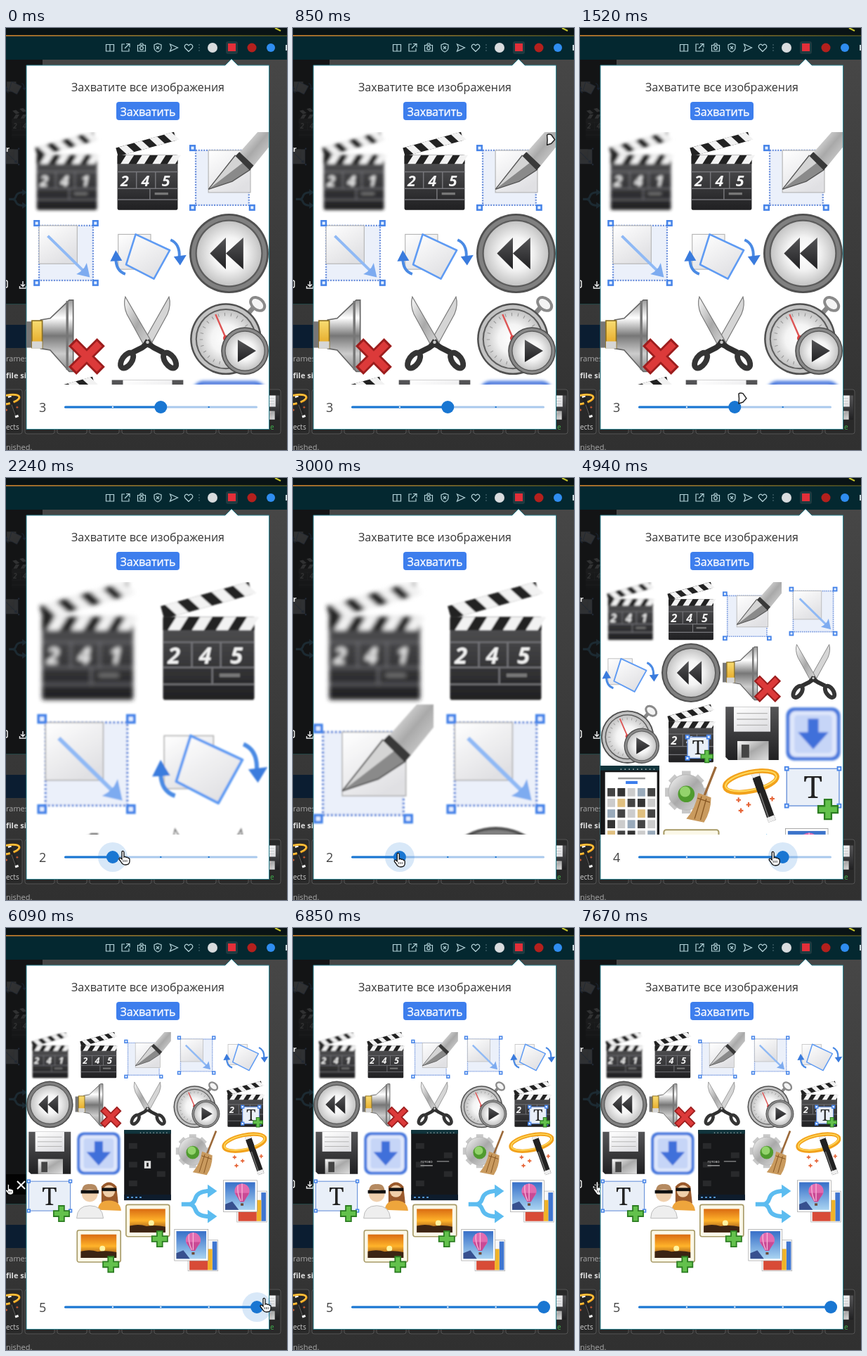
These frames come from a looping animation (400 by 600 pixels, 7700 ms). An HTML page:

```html
<!DOCTYPE html>
<html lang="ru">
<head>
<meta charset="utf-8">
<style>
html, body { margin: 0; width: 100%; height: 100%; overflow: hidden; background: #3a3a3a }
svg { display: block }
text { font-family: "Open Sans", "Noto Sans", sans-serif }
</style>
</head>
<body>
<svg id="stage" width="400" height="600" viewBox="0 0 400 600"></svg>
<script>
const LOOP = 7700, stage = document.getElementById('stage');
const R = (x, y, w, h, fill, more = '') => `<rect x="${x}" y="${y}" width="${w}" height="${h}" fill="${fill}" ${more}/>`;
const C = (x, y, r, fill, more = '') => `<circle cx="${x}" cy="${y}" r="${r}" fill="${fill}" ${more}/>`;
const P = (d, fill, more = '') => `<path d="${d}" fill="${fill}" ${more}/>`;
const L = (d, color, w, more = '') => P(d, 'none', `stroke="${color}" stroke-width="${w}" ${more}`);
const E = (x, y, rx, ry, turn, fill, color, w) =>
  `<ellipse rx="${rx}" ry="${ry}" fill="${fill}" stroke="${color}" stroke-width="${w}" transform="translate(${x} ${y}) rotate(${turn})"/>`;
const T = (x, y, size, fill, s, more = '') => `<text x="${x}" y="${y}" font-size="${size}" fill="${fill}" ${more}>${s}</text>`;
const G = (tf, s, more = '') => `<g transform="${tf}" ${more}>${s}</g>`;
const stops = colors => colors.map((c, i) => `<stop offset="${i / (colors.length - 1)}" stop-color="${c}"/>`).join('');
const grad = (id, colors, x2 = 0, y2 = 1) => `<linearGradient id="${id}" x1="0" y1="0" x2="${x2}" y2="${y2}">${stops(colors)}</linearGradient>`;
const blur = (id, d) => `<filter id="${id}"><feGaussianBlur stdDeviation="${d}"/></filter>`;

// Icon parts, drawn in a 100-unit cell
const bar = (tf, lean) => G(tf, R(0, 0, 76, 11, '#222') + [4, 24, 44, 63].map(x =>
  P(lean > 0 ? `M${x} 11l7-11h10l-7 11z` : `M${x} 0l7 11h10l-7-11z`, '#f2f2f2')).join(''));
const clap = digits => bar('translate(10 20) rotate(-15.5)', -1) + R(12, 29, 76, 69, 'url(#dark)', 'rx="2"') +
  bar('translate(12 29)', 1) + L('M12 50H88M12 71H88M36 50V71M60 50V71M53 71V85M12 85H88', '#77777b', 1.3) +
  [...digits].map((c, i) => T(16 + i * 26, 68, 19, '#f4f4f4', c, 'font-weight="700" font-style="italic"')).join('') +
  R(59, 76, 17, 3, '#777');
const handle = (x, y) => R(x - 4, y - 4, 8, 8, '#4583e8') + R(x - 1.8, y - 1.8, 3.6, 3.6, '#e4efff');
const frame = (x, y, w, h) => R(x, y, w, h, '#ebf0fa', 'stroke="#6c90dc" stroke-width="2" stroke-dasharray="1.8 1.5"');
const page = (x, y, w, h) => R(x, y, w, h, 'url(#paper)', 'stroke="#b4b4b4" stroke-width="1"');
const plus = (x, y, r) => [['#2c7d22', r * .8, r], ['#63c14c', r * .5, r * .85]].map(([c, w, q]) =>
  L(`M${x - q} ${y}h${2 * q}M${x} ${y - q}v${2 * q}`, c, w)).join('');
const textBox = (x, y, w, h, size) => R(x, y, w, h, '#e9eff8', 'stroke="#5b87d6" stroke-width="1.5"') +
  handle(x, y) + handle(x + w, y) + handle(x, y + h) + handle(x + w, y + h) +
  T(x + w / 2, y + h / 2 + size * .36, size, '#222', 'T', 'text-anchor="middle" style="font-family:\'Noto Serif\',serif"');
const disc = (x, y, r, ring) => C(x, y, r, '#505050') + C(x, y, r * .95, ring) + C(x, y, r * .85, '#5c5c5c') + C(x, y, r * .81, 'url(#dial)');
const photo = R(4, 5, 93, 68, '#fbf8e8', 'rx="4" stroke="#a89b68" stroke-width="2.5"') + R(12, 14, 76, 50, 'url(#sun)') +
  C(58, 44, 6, '#fff3a0') + P('M12 50q20-5 36 1 20-4 40 1v12H12z', '#3b2413') + plus(76, 78, 18);
const star = (x, y) => L(`M${x - 4} ${y}h8M${x} ${y - 4}v8`, '#e66436', 2.5);

const icons = [
  G('translate(1 0)', clap('241')),
  clap('245'),
  frame(8, 23, 67, 69) + page(24, 23, 53, 53) + handle(4, 20) + handle(4, 95) + handle(79, 95) +
    P('M24 72L58 29 68 38z', '#d4d4d4') + P('M24 72L68 38 77 47 54 62z', '#8a8a8a') + L('M24 72L58 29M24 72L54 62 77 47', '#555', 1.2) +
    P('M62 27L86 0H100V19L79 45z', 'url(#metal)') + P('M58 30L63 25 81 42 76 48z', '#393939'),
  frame(16, 15, 68, 69) + page(16, 15, 48, 48) + L('M27 28L76 76', '#8fb9f5', 3.5) + P('M80 80L63 76 68 73 73 68 76 62z', '#7dabf0') +
    handle(13, 12) + handle(87, 12) + handle(13, 87) + handle(87, 87),
  page(13, 26, 41, 44) + P('M35 26L78 46 58 82 23 64z', 'url(#paper)', 'stroke="#5f9bf3" stroke-width="2.3" stroke-linejoin="round"') +
    L('M22 76Q10 72 10 56M79 33Q91 38 90 55', '#4a8ae4', 3.5) + P('M10 46L18 59 3 60zM91 65L99 52 83 54z', '#3a7bdd'),
  disc(50, 50, 50, '#808080') + P('M26 50L46 30V70zM46 50L68 30V70z', 'url(#dark)'),
  P('M18 31L30 29 54 6H59V96H54L30 69 18 67z', 'url(#cone)', 'stroke="#666" stroke-width="1.5"') + R(50, 7, 3, 87, '#777') +
    R(0, 33, 8, 33, '#777') + R(7, 32, 13, 34, 'url(#gold)', 'stroke="#8d7021" stroke-width="1.5"') + R(7, 58, 13, 9, '#d6d6d6') +
    L('M58 59L94 95M94 59L58 95', '#9c1d1d', 14) + L('M60 61L92 93M92 61L60 93', '#dc3a3a', 9),
  P('M77 2Q80 12 75 24L52 66 43 62z', '#d5d5d5', 'stroke="#777" stroke-width="1"') +
    P('M22 2Q19 12 24 24L47 66 57 62z', 'url(#metal)', 'stroke="#777" stroke-width="1"') +
    L('M54 58L43 66 31 72M46 58L58 66 70 72', '#303030', 7) + C(50, 59, 2, '#ccc') +
    E(24, 82, 6, 11, 35, 'none', '#353535', 7) + E(78, 82, 6, 11, -35, 'none', '#353535', 7),
  L('M74 23L82 14', '#888', 6) + E(86, 11, 10, 7, 40, '#f4f4f4', '#8a8a8a', 3.5) +
    disc(46, 55, 45, '#c2c2c2') + C(46, 55, 31, 'none', 'stroke="#999" stroke-width="4" stroke-dasharray="1 7"') + L('M33 24L46 54', '#d55', 2.2) +
    C(46, 54, 3.5, '#d44') + disc(70, 70, 30, '#8a8a8a') + P('M61 56L84 70 61 84z', 'url(#dark)'),
  clap('24 ') + textBox(44, 55, 36, 36, 32) + plus(77, 88, 11),
  P('M5 4H95V94H10L5 89z', 'url(#dark)') + R(19, 4, 62, 42, 'url(#paper)') + L('M24 15H76M24 25H76M24 35H76', '#b5b5b5', 1.5) +
    R(25, 62, 53, 32, 'url(#metal)') + R(32, 68, 13, 22, '#444'),
  R(4, 5, 92, 90, '#4a79dd', 'rx="14"') + R(10, 11, 80, 78, '#dfe7fb', 'rx="10"') + R(18, 18, 64, 64, '#c6d5f7', 'rx="6"') +
    P('M41 24H59V47H76L50 76 24 47H41z', '#3f6fda'),
  R(0, 0, 100, 150, '#161719') + R(0, 0, 100, 8, '#10343c') + L('M34 6H92', '#ccc', 1.5, 'stroke-dasharray="2 5"') +
    '<g opacity=".2">' + [0, 1, 2, 3, 4].map(i => R(10 + i % 2 * 60, 28 + i * 20, 18, 12, '#777')).join('') + '</g>' +
    R(0, 138, 100, 12, '#0e1c2c') + L('M6 144H42', '#5aa0e0', 3, 'stroke-dasharray="4 5"'),
  L('M42 9V81M6 45H78M17 20L67 70M67 20L17 70', '#c8c8c8', 15) + C(42, 45, 30, 'url(#metal)', 'stroke="#bbb" stroke-width="1.5"') +
    C(42, 48, 14, '#4f9b2e') + C(40, 44, 9, '#93d36c') + L('M92 2L73 50', '#9c6a3a', 4) +
    P('M62 46L84 54Q84 78 72 96L42 90Q58 72 62 46z', '#c99a5e') + L('M68 52L56 90M76 56L66 92M61 55L82 62', '#875723', 1.5),
  L('M54 10L84 94', '#222', 13) + L('M51 12L80 94', '#777', 2) + L('M54 10L57 19M81 86L84 94', '#eee', 13) +
    E(48, 27, 45, 16, -12, 'none', '#f2a21c', 8) + E(48, 26, 44, 15, -12, 'none', '#ffd95a', 2.5) +
    L('M57 20L66 45', '#222', 13) + star(27, 58) + star(44, 66) + star(84, 56) + star(31, 76),
  textBox(5, 5, 89, 63, 52) + plus(75, 74, 18),
  P('M56 16Q72-2 88 16L92 52H56z', '#9a5a2c') + C(72, 26, 13, '#f0cfaa') + P('M48 66Q50 46 72 46 96 46 98 68z', '#eea53c') +
    C(31, 32, 17, '#f0d0ae') + P('M14 28Q14 10 31 11 48 10 48 28 31 16 14 28z', '#b58a60') +
    P('M3 84Q4 57 31 57 58 57 60 84z', '#eee', 'stroke="#bbb" stroke-width="1.5"') + R(12, 24, 38, 7, '#111') + R(57, 19, 31, 7, '#111'),
  photo,
  G('translate(0 6)', L('M18 48H34Q44 48 48 35T72 20H78M34 48Q44 48 48 60T72 74H78', '#5cbcf0', 9) + P('M74 6L94 20 74 34zM74 60L94 74 74 88z', '#5cbcf0')),
  R(32, 26, 64, 66, '#f8f8f8', 'stroke="#aaa" stroke-width="1"') + R(84, 29, 10, 61, '#3f76d0') + R(74, 45, 10, 45, '#f0b328') + R(35, 70, 39, 20, '#d84b37') +
    R(3, 3, 72, 67, '#fff', 'stroke="#999" stroke-width="1"') + R(7, 7, 64, 59, 'url(#sky)') +
    C(43, 26, 16, '#e26bb0') + P('M28 30L39 49H47L58 30z', '#c94a95') + L('M43 10V47M34 13Q32 30 40 47', '#f7b4d8', 2) + R(40, 52, 6, 5, '#6d4a35') + P('M7 66V54L22 48 36 66z', '#37508f')
];
const blurry = [0, 11];
const popupShot = R(8, 11, 88, 139, '#fff') + R(30, 20, 46, 3, '#999') + R(43, 26, 20, 5, '#3b7ded') +
  [...Array(30).keys()].map(i => R(12 + i % 5 * 17, 38 + (i / 5 | 0) * 18, 13, 14, ['#444', '#ccc', '#9ab', '#333', '#e0c080'][i * 3 % 7 % 5])).join('');
const order = [...Array(20).keys(), -1, 17, -1, 19];

const defs = '<defs>' + grad('metal', ['#fafafa', '#a9a9a9', '#dedede'], 1) + grad('paper', ['#fff', '#e0e0e3'], .6) +
  grad('dark', ['#555557', '#202022']) + grad('cone', ['#999', '#fff', '#777', '#ccc', '#888']) +
  grad('gold', ['#f8dc72', '#e3a21c']) + grad('sun', ['#d96b12', '#ffb32a', '#7a3a12']) + grad('sky', ['#376fc8', '#a9d4f2']) +
  grad('page', ['#484848', '#3c3c3c', '#303030']) + grad('glow', ['#c07a28', '#7d6a26', '#3a4418'], 1, 0) +
  `<radialGradient id="dial">${stops(['#fff', '#f4f4f4', '#c4c4c4'])}</radialGradient>` + blur('fine', .6) + blur('soft', 1.8) +
  '<clipPath id="view"><rect x="29" y="148" width="345" height="359"/></clipPath>' +
  icons.map((s, i) => `<g id="i${i}" filter="url(#${blurry.includes(i) ? 'soft' : 'fine'})">${s}</g>`).join('') + '</defs>';
const icon = (i, x, y, s) => `<use href="#i${i}" transform="translate(${x} ${y}) scale(${s})"/>`;

const tools = L('M142.5 23.5H148V33H142.5zM148 23.5H153.5V33H148M169 23H165V33H175V29M169 29L175.5 22.5M171 22.5H176V27.5' +
  'M187.5 24.5H198.5V33H187.5zM190.5 24L191.5 22H194.5L195.5 24M216 22L221 24V28Q221 32 216 34 211 32 211 28V24zM214 26L218 30M218 26L214 30' +
  'M233.5 23L244.5 28 233.5 33 235.5 28zM260 33.5L255 28.5Q253 25.5 256 23.5 258 22.5 260 25 262 22.5 264 23.5 267 25.5 265 28.5z', '#b4d2d8', 1.2) +
  C(193, 28.5, 2.3, 'none', 'stroke="#b4d2d8" stroke-width="1.2"') + L('M275 23V34', '#52717a', 1, 'stroke-dasharray="2 2"') +
  C(294, 28, 7, '#d9dcde') + R(313, 19, 17, 18, '#1f3a40', 'rx="3"') + R(316, 22, 11, 11, '#e32f39') +
  C(350, 28, 6.5, '#b3201d') + C(377, 28, 6, '#2f8df0') + R(398, 24, 2, 8, '#c7d5d8');
let buttons = '';
for (let x = -19; x < 380; x += 46) buttons += R(x, 514, 42, 63, '#292929', 'rx="3" stroke="#555"');
const back = R(0, 0, 400, 600, 'url(#page)') + R(0, 45, 52, 347, '#131415') + R(0, 0, 400, 11, '#091315') + R(0, 10, 400, 1.6, 'url(#glow)') +
  R(0, 12, 400, 33, '#042830') + L('M383 0L391 4', '#c6c72c', 2) + tools +
  '<g opacity=".13">' + icon(4, -3, 68, .32) + icon(1, 2, 108, .52) + icon(3, -8, 168, .3) + icon(18, -2, 225, .34) + '</g>' +
  R(0, 392, 29, 1, '#244') + R(0, 422, 29, 33, '#0b1d31') + T(0, 474, 11, '#aaa', 'rames') + T(0, 498, 11, '#ddd', 'file si', 'font-weight="700"') +
  buttons + icon(14, -16, 518, .38) + icon(10, 353, 521, .38) + T(0, 571, 10, '#ccc', 'ects') + T(376, 571, 10, '#3fae4c', 'e') + T(0, 600, 11, '#aaa', 'nished.') +
  '<g id="strip"></g>';
const panel = P('M29 53H312L321 44 330 53H374.5V570.5H29z', '#fff', 'stroke="#2c8492"') +
  T(202, 90, 16, '#333', 'Захватите все изображения', 'text-anchor="middle"') + R(157, 105, 90, 26, '#3d7eed', 'rx="4"') +
  T(202, 124.5, 16, '#fff', 'Захватить', 'text-anchor="middle" stroke="#fff" stroke-width=".3"');
stage.innerHTML = defs + back + panel + '<g id="grid" clip-path="url(#view)"></g><g id="slider"></g><g id="cursor"></g>';
const [strip, grid, slider, cursor] = ['strip', 'grid', 'slider', 'cursor'].map(id => document.getElementById(id));

const hand = P('M4 1Q4-1 6-.5 7.2 0 7 2V8Q9 6.5 10 8.5 12 7.5 13 9.5 15 9 15 11.5V14Q15 19 9 19 5 19 3 15L0 11Q0 8.500 2.5 9.5L4 11z',
  '#fff', 'stroke="#111" stroke-width="1.3" transform="translate(-5 0)"') + L('M10 12V15M7.5 12V15M5 12V15', '#111', .8, 'transform="translate(-4 0)"');
const pointer = P('M1 2Q3 0 7 1.5L12 8.5 7 14 1 16 1.500 9z', '#fff', 'stroke="#222" stroke-width="1.5" stroke-linejoin="round"');

// Column counts over time; each change shows the old columns first, then reflows
const steps = [[0, 3], [2240, 2], [4200, 3], [4600, 4], [5200, 5]], REFLOW = 200;
const path = [[670, 392, 46], [1420, 262, 478], [1520, 225, 518], [1700, 217, 533], [2000, 211, 533], [2239, 187, 532], [2240, 166, 531], [2700, 150, 534],
  [3880, 147, 534], [4200, 186, 533], [4600, 255, 532], [4940, 274, 532], [5200, 324, 531], [5500, 367, 527], [6240, 367, 527], [6700, 399, 579]];

function layout(cols, flow, popup) {
  const w = (345 - 3 * (cols - 1)) / cols, tops = Array(flow).fill(148);
  return order.map((id, i) => {
    const c = i % flow, x = 29 + c * (w + 3), y = tops[c];
    tops[c] += (id === 12 ? 1.5 : 1) * w + 3;
    if (id < 0 || c >= cols || y > 507) return '';
    return icon(id, x, y, w / 100) + (id === 12 ? G(`translate(${x} ${y}) scale(${w / 100})`, popup) : '');
  }).join('');
}

function sliderView(value, halo) {
  const at = v => 83.5 + (v - 1) * 68.4, x = at(value);
  return T(47, 546, 18, '#444', value) + R(83, 537.5, 275, 3, '#a9c9ed', 'rx="1.5"') + R(83, 537.5, x - 83, 3, '#1976d2', 'rx="1.5"') +
    [2, 3, 4].map(v => R(at(v) - 1, 538, 2, 2, v < value ? '#e4effb' : '#1976d2')).join('') +
    (halo ? C(x, 539, 21, '#1976d2', 'opacity=".17"') : '') + C(x, 539, 9, '#1976d2');
}

function stripView(label, mode) {
  const save = L('M24 360V367M21 364.5L24 367.5 27 364.5M19.5 367V370H28.5V367', '#e8e8e8', 1.5);
  return (label ? T(0, 176, 11, '#eee', 'r', 'font-weight="700"') : '') +
    (mode === 1 ? R(0, 350, 29, 29, '#030303') + G('translate(3 365) scale(.75)', hand) + L('M16 360L27 371M27 360L16 371', '#fff', 2)
      : R(-4, 359, 6, 10, 'none', 'rx="2" stroke="#eee" stroke-width="1.5"') + save + (mode === 2 ? G('translate(24 361)', hand) : ''));
}

function shotView(t) {
  if (t < 5400) return popupShot;
  if (t < 6500) return R(43, 66, 14, 16, '#ddd') + R(48, 70, 4, 8, '#222');
  return T(20, 70, 8, '#ddd', 'готово') + R(20, 75, 26, 2, '#aaa') + R(55, 66, 26, 2, '#888');
}

const seen = new Map();
function show(node, key, make) {
  if (seen.get(node) === key) return;
  seen.set(node, key);
  node.innerHTML = make();
}

function draw() {
  const t = performance.now() % LOOP;
  const n = steps.findLastIndex(s => t >= s[0]), [since, cols] = steps[n];
  const flow = n && t < since + REFLOW ? steps[n - 1][1] : cols;
  const shot = shotView(t);
  show(grid, [cols, flow, shot].join(), () => layout(cols, flow, shot));
  const halo = t > 1640 && t < 6330;
  show(slider, cols + '' + halo, () => sliderView(cols, halo));
  const label = t < 1450 || t > 2700 && t < 5400 || t > 6400, mode = t > 5500 && t < 6240 ? 1 : t > 6900 ? 2 : 0;
  show(strip, label + '' + mode, () => stripView(label, mode));

  const k = path.findIndex(p => t < p[0]);
  const kind = k < 1 ? '' : halo ? hand : pointer;
  show(cursor, kind, () => kind);
  if (kind) {
    const [t0, x0, y0] = path[k - 1], [t1, x1, y1] = path[k], f = (t - t0) / (t1 - t0);
    cursor.setAttribute('transform', `translate(${x0 + (x1 - x0) * f} ${y0 + (y1 - y0) * f})`);
  }
  requestAnimationFrame(draw);
}
draw();
</script>
</body>
</html>
```
